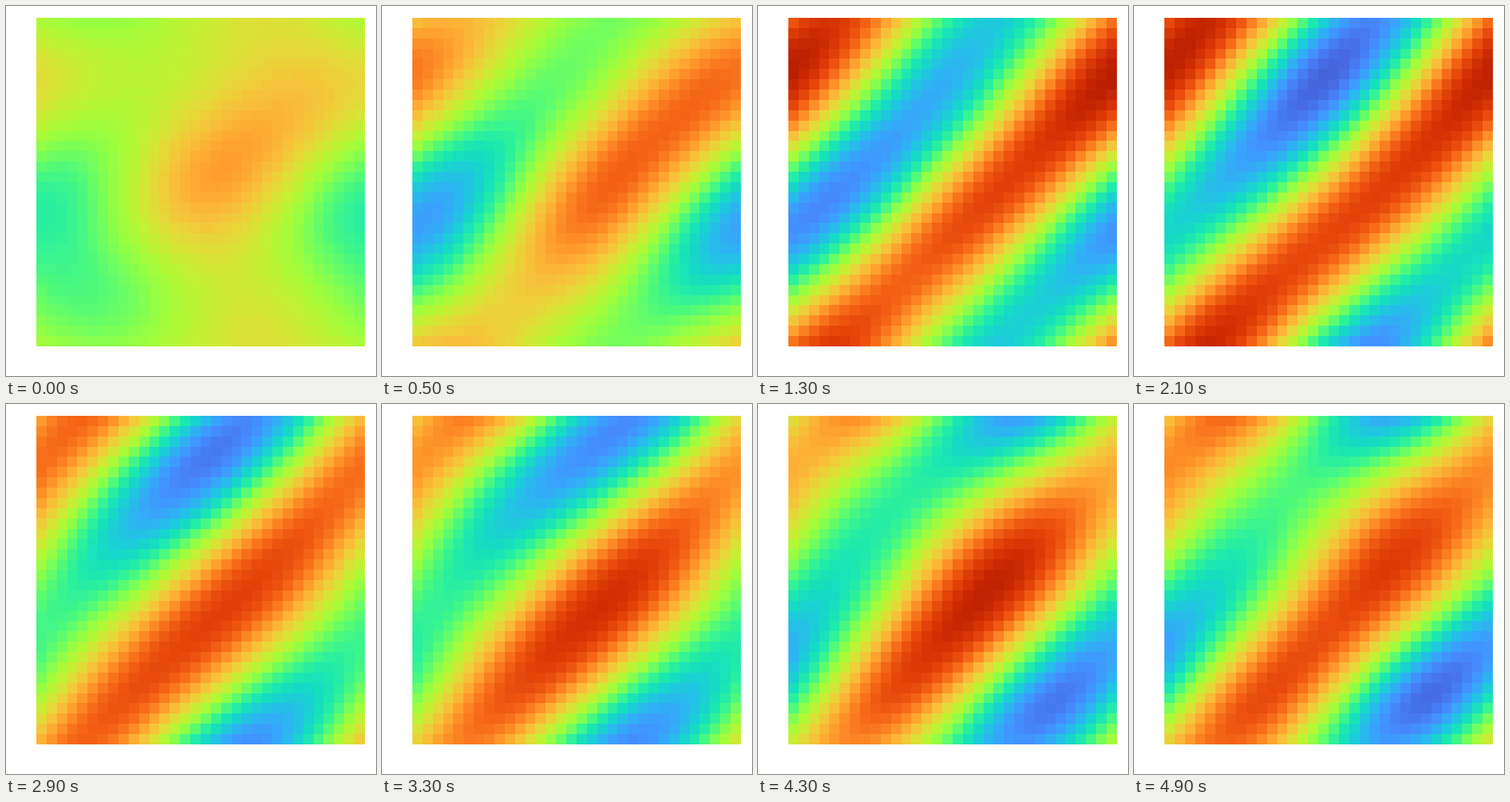
These frames come from a looping animation (500x500 px, 5 s). A matplotlib script:

```python
import numpy as np
import matplotlib.pyplot as plt
from matplotlib.animation import FuncAnimation

CELLS = 32
FRAMES = 50
INTERVAL = 100
MEAN_LEVEL = 0.54

rows, cols = np.mgrid[:CELLS, :CELLS] * 2 * np.pi / CELLS


def swing(t, period, peak):
    """Cosine of the given period that is 1 at time `peak`."""
    return np.cos(2 * np.pi * (t - peak) / period)


def main_wave(t):
    """Diagonal bands: fast growth, a surge, then a steady level."""
    surge = np.exp(-((t - 1.7) / 0.7) ** 2)
    strength = 26.5 - 22 * np.exp(-2 * t) + 8.5 * surge
    phase = -44 + 29 * np.exp(-3 * t) - 5 * surge
    return strength * np.exp(1j * np.radians(phase))


def wave_amplitudes(t):
    """Complex amplitude, in percent, of each (across, down) wave."""
    return {
        (1, 1): main_wave(t),
        (1, 0): -7 * swing(t, 4.3, 0) + 1j * (4.5 - 1.5 * t),
        (0, 1): (-2.5 + 6 * swing(t, 5.4, 1)
                 - 1j * (0.5 + 5.5 * swing(t, 5, 0.3))),
        (1, 2): -2 + 0.9 * t + 1.5j * swing(t, 4, 1.3),
        (1, -1): 2.5 - 0.8 * t + 1j * (2.2 - 0.9 * t),
    }


def field(frame):
    t = frame * INTERVAL / 1000
    waves = sum((z * np.exp(1j * (across * cols + down * rows))).real
                for (across, down), z in wave_amplitudes(t).items())
    return MEAN_LEVEL + waves / 100


fig = plt.figure(figsize=(5, 5), dpi=100, facecolor="white")
ax = fig.add_axes([41 / 500, 40 / 500, 444 / 500, 444 / 500])
ax.axis("off")
image = ax.imshow(field(0), cmap="turbo", vmin=0, vmax=1,
                  interpolation="nearest", aspect="auto")


def update(frame):
    image.set_data(field(frame))
    return [image]


animation = FuncAnimation(fig, update, frames=FRAMES, interval=INTERVAL,
                          repeat=True, repeat_delay=0)
plt.show()
```
